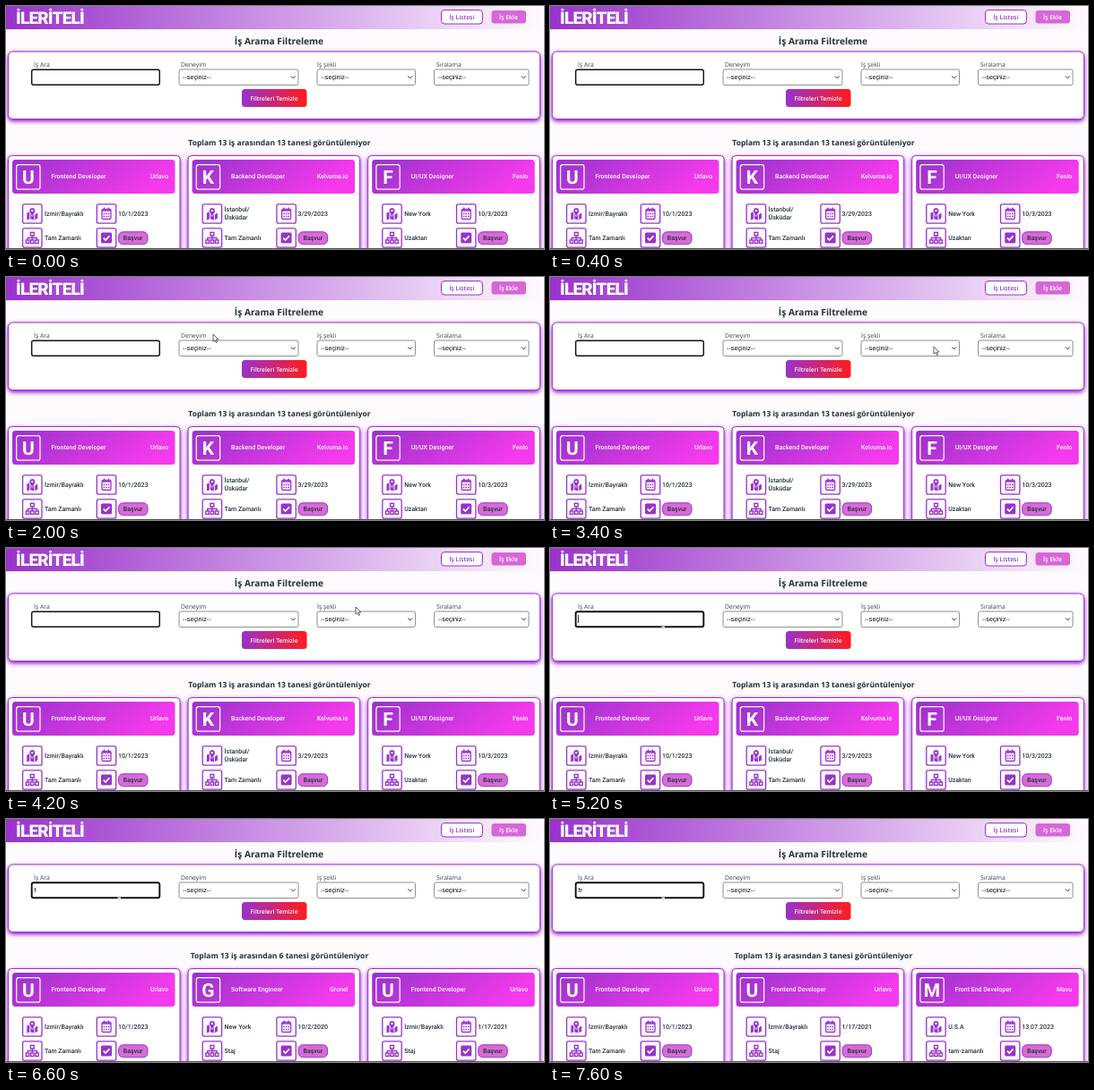
Animation of 600x272 px, one loop 8 s. Source, as an HTML page:

```html
<!DOCTYPE html>
<html lang="tr">
<head>
<title>&Idot;&scedil; Arama</title>
<style>
html, body { margin: 0; width: 100%; height: 100%; overflow: hidden; background: #fefbff; }
svg { display: block; width: 600px; height: 272px; text-rendering: geometricPrecision; }
text { font-family: "Open Sans", "Noto Sans", sans-serif; fill: #213038; }
.card text { font-family: Roboto, sans-serif; font-size: 7px; font-weight: 500; }
.field text { font-family: "Liberation Sans", Arial, sans-serif; font-size: 7.2px; fill: #000; }
.label { font-size: 6.9px; fill: #39444b; }
.mid { text-anchor: middle; }
.end { text-anchor: end; }
text.white, .card text.white { fill: #fff; }
.card text.initial { font-size: 21px; font-weight: 700; }
.glow { fill: #fff; stroke: #9932cc; filter: drop-shadow(0 2px 2.5px #9400d3); }
.line { fill: none; stroke: #9932cc; stroke-width: 1.3; }
</style>
</head>
<body>
<svg id="stage" viewBox="0 0 600 272">
  <defs>
    <linearGradient id="bar"><stop stop-color="#9932cc"/><stop offset="1" stop-color="#fffaff"/></linearGradient>
    <linearGradient id="head" x2="1" y2=".25"><stop stop-color="#9932cc"/><stop offset="1" stop-color="#f43aec"/></linearGradient>
    <linearGradient id="clear"><stop stop-color="#9932cc"/><stop offset="1" stop-color="#ff1c1c"/></linearGradient>
    <g id="map">
      <path d="M-6-1-3-2V6L-6 7zM-2-1 2 1V7L-2 6zM3 1 6-1V5L3 7z" fill="#9932cc"/>
      <path d="M0 3C-2 0-3.4-1.5-3.4-3.4a3.4 3.4 0 0 1 6.8 0C3.4-1.5 2 0 0 3z" fill="#9932cc" stroke="#fff" stroke-width=".7"/>
      <circle cy="-3.4" r="1.2" fill="#fff"/>
    </g>
    <g id="calendar">
      <rect x="-5" y="-5" width="10" height="11" rx="1.2" class="line"/>
      <path d="M-5-3.5H5M-2.5-7V-4M2.5-7V-4" class="line" stroke-width="2"/>
      <path d="M-3.4 0H3.4M-3.4 3H3.4" class="line" stroke-dasharray="1.6 1"/>
    </g>
    <g id="tree" class="line">
      <path d="M-2-6H2V-2.5H-2zM-7 2.5H-3.5V6H-7zM-1.7 2.5H1.7V6H-1.7zM3.5 2.5H7V6H3.5zM0-2.5V2.5M-5.2 2.5V0H5.2V2.5"/>
    </g>
    <g id="check">
      <rect x="-6" y="-6" width="12" height="12" rx="1.5" fill="#9932cc"/>
      <path d="M-3.3.2-1 2.5 3.4-2.2" fill="none" stroke="#fff" stroke-width="1.7"/>
    </g>
  </defs>

  <rect width="600" height="272" fill="#fefbff"/>
  <rect width="600" height="26" fill="url(#bar)"/>
  <text x="11" y="19.5" class="white" style="font:900 19px Roboto,sans-serif;letter-spacing:-.8px">&Idot;LER&Idot;TEL&Idot;</text>
  <rect x="485.5" y="4.5" width="46" height="15.5" rx="3.5" fill="#fff" stroke="#9932cc"/>
  <text x="508.3" y="15" class="mid" font-size="6.9" style="fill:#9932cc" font-weight="600">&Idot;&scedil; Listesi</text>
  <rect x="541.5" y="5" width="38.5" height="14.5" rx="3" fill="#d667d6"/>
  <text x="560.5" y="15" class="mid white" font-size="6.9" font-weight="600">&Idot;&scedil; Ekle</text>

  <text x="304.5" y="42.5" class="mid" font-size="10.2" font-weight="700">&Idot;&scedil; Arama Filtreleme</text>
  <rect x="2.5" y="51" width="593" height="75.5" rx="5" class="glow"/>
  <g id="filters"></g>
  <rect id="searchBox" x="28.7" y="71.2" width="142.6" height="17" rx="2" fill="#fff" stroke="#111"/>
  <g class="field"><text id="query" x="31.5" y="82"></text></g>
  <path id="caret" d="M31.5 75V84" stroke="#000" stroke-width=".8"/>
  <path id="beam" d="M124.5 88.3H128" stroke="#eee" stroke-width="1.4"/>
  <rect x="263" y="93" width="72.5" height="20" rx="3.5" fill="url(#clear)"/>
  <text x="299" y="105.7" class="mid white" font-size="6.7" font-weight="600">Filtreleri Temizle</text>

  <text id="summary" x="305" y="155.5" class="mid" font-size="8.5" font-weight="700"></text>
  <g id="cards"></g>
  <path d="M0 271.5H600" stroke="#555"/>
  <path id="pointer" d="M0 0V8.2L1.9 6.5 3.2 9.4 4.6 8.8 3.3 6H5.8z" fill="#fff" stroke="#222" stroke-width=".7"/>
</svg>
<script>
const $ = id => document.getElementById(id);
const LOOP = 8000, STEP = 200;
const FOCUS = 4800, TYPE_F = 6400, TYPE_R = 7400;

// Strings are markup; "|" separates the lines of a place
const frontend = { title: "Frontend Developer", company: "Urlavo", place: "&Idot;zmir/Bayrakl&imath;", date: "10/1/2023", type: "Tam Zamanl&imath;" };
const frontendIntern = { ...frontend, date: "1/17/2021", type: "Staj" };
const backend = { title: "Backend Developer", company: "Kelvuma.io", place: "&Idot;stanbul/|&Uuml;sk&uuml;dar", date: "3/29/2023", type: "Tam Zamanl&imath;" };
const designer = { title: "UI/UX Designer", company: "Fenlo", place: "New York", date: "10/3/2023", type: "Uzaktan" };
const engineer = { title: "Software Engineer", company: "Grunel", place: "New York", date: "10/2/2020", type: "Staj" };
const frontEnd = { title: "Front End Developer", company: "Mavu", place: "U.S.A", date: "13.07.2023", type: "tam-zamanl&imath;" };

const results = {
  "": { count: 13, jobs: [frontend, backend, designer] },
  f: { count: 6, jobs: [frontend, engineer, frontendIntern] },
  fr: { count: 3, jobs: [frontend, { ...frontendIntern, titleX: 46 }, frontEnd] }
};

// Pointer stops: time, x, y
const path = [[1400, 130, 78], [1600, 178, 72], [2000, 231, 64], [2400, 258, 76], [2600, 266, 77],
  [3400, 428, 78], [3800, 510, 77], [4200, 390, 66], [4600, 170, 78], [4800, 126, 82]];

const text = (x, y, value, cls = "") => `<text x="${x}" y="${y}" class="${cls}">${value}</text>`;

const select = (x, width, label, labelX) => text(labelX, 68, label, "label") + `<g class="field">
  <rect x="${x}" y="71" width="${width}" height="17.5" rx="2" fill="#fff" stroke="#858585" stroke-width=".9"/>
  ${text(x + 4, 82, "--se&ccedil;iniz--")}
  <path d="M${x + width - 8} 78.5l2.3 2.3 2.3-2.3" fill="none" stroke="#222"/></g>`;

const icon = (name, x, y) => `<rect x="${x - 10.7}" y="${y - 10.7}" width="21.4" height="21.4" rx="2" class="line"/>
  <use href="#${name}" x="${x}" y="${y}"/>`;

function card(job, index) {
  const lines = job.place.split("|");
  const place = lines.map((line, i) => text(43, lines.length > 1 ? 230 + i * 9 : 234.5, line)).join("");
  return `<g class="card" transform="translate(${index * 200.6})">
    <rect x="2.5" y="167.5" width="191.5" height="120" rx="4" class="glow"/>
    <rect x="7" y="172" width="181.5" height="38" rx="3.5" fill="url(#head)"/>
    <rect x="11.7" y="177.7" width="26.3" height="27.5" rx="2.5" fill="none" stroke="#fff" stroke-width="1.2"/>
    ${text(24.8, 198.7, job.company[0], "initial white mid")}
    ${text(job.titleX ?? 50.5, 193.3, job.title, "white")}
    ${text(181, 193.3, job.company, "white end")}
    ${icon("map", 29.3, 232.5)}${icon("calendar", 112, 232.5)}
    ${icon("tree", 29.3, 259.5)}${icon("check", 112, 259.5)}
    ${place}${text(125, 234.5, job.date)}${text(43, 261.7, job.type)}
    <rect x="125.5" y="252.8" width="32.5" height="14" rx="5" fill="#d76bd6" stroke="#9932cc"/>
    ${text(141.7, 262, "Ba&scedil;vur", "mid")}</g>`;
}

$("filters").innerHTML = text(31, 68, "&Idot;&scedil; Ara", "label") + select(193, 133, "Deneyim", 195)
  + select(347, 109.5, "&Idot;&scedil; &scedil;ekli", 347) + select(477.5, 105.5, "S&imath;ralama", 480);

let shownQuery = null;
function showResults(query) {
  if (query === shownQuery) return;
  shownQuery = query;
  const { count, jobs } = results[query];
  $("query").textContent = query;
  $("summary").innerHTML =
    `Toplam 13 i&scedil; aras&imath;ndan ${count} tanesi g&ouml;r&uuml;nt&uuml;leniyor`;
  $("cards").innerHTML = jobs.map(card).join("");
}

const show = (id, visible) => $(id).setAttribute("visibility", visible ? "visible" : "hidden");

function pointerAt(t) {
  const next = path.findIndex(stop => stop[0] > t);
  if (next < 1) return null;
  const [a, b] = [path[next - 1], path[next]];
  const k = (t - a[0]) / (b[0] - a[0]);
  return [a[1] + (b[1] - a[1]) * k, a[2] + (b[2] - a[2]) * k];
}

function draw(now) {
  const t = Math.floor(now % LOOP / STEP) * STEP;
  const query = t >= TYPE_R ? "fr" : t >= TYPE_F ? "f" : "";
  const focused = t >= FOCUS;
  showResults(query);
  $("searchBox").setAttribute("stroke-width", focused ? 1.9 : 1.4);
  show("beam", focused);
  show("caret", focused && Math.floor(t / 500) % 2 === 0);
  $("caret").setAttribute("transform", `translate(${[0, 2.2, 4.7][query.length]})`);
  const pointer = pointerAt(t);
  show("pointer", pointer);
  if (pointer) $("pointer").setAttribute("transform", `translate(${pointer})`);
  requestAnimationFrame(draw);
}
draw(performance.now());
</script>
</body>
</html>
```
